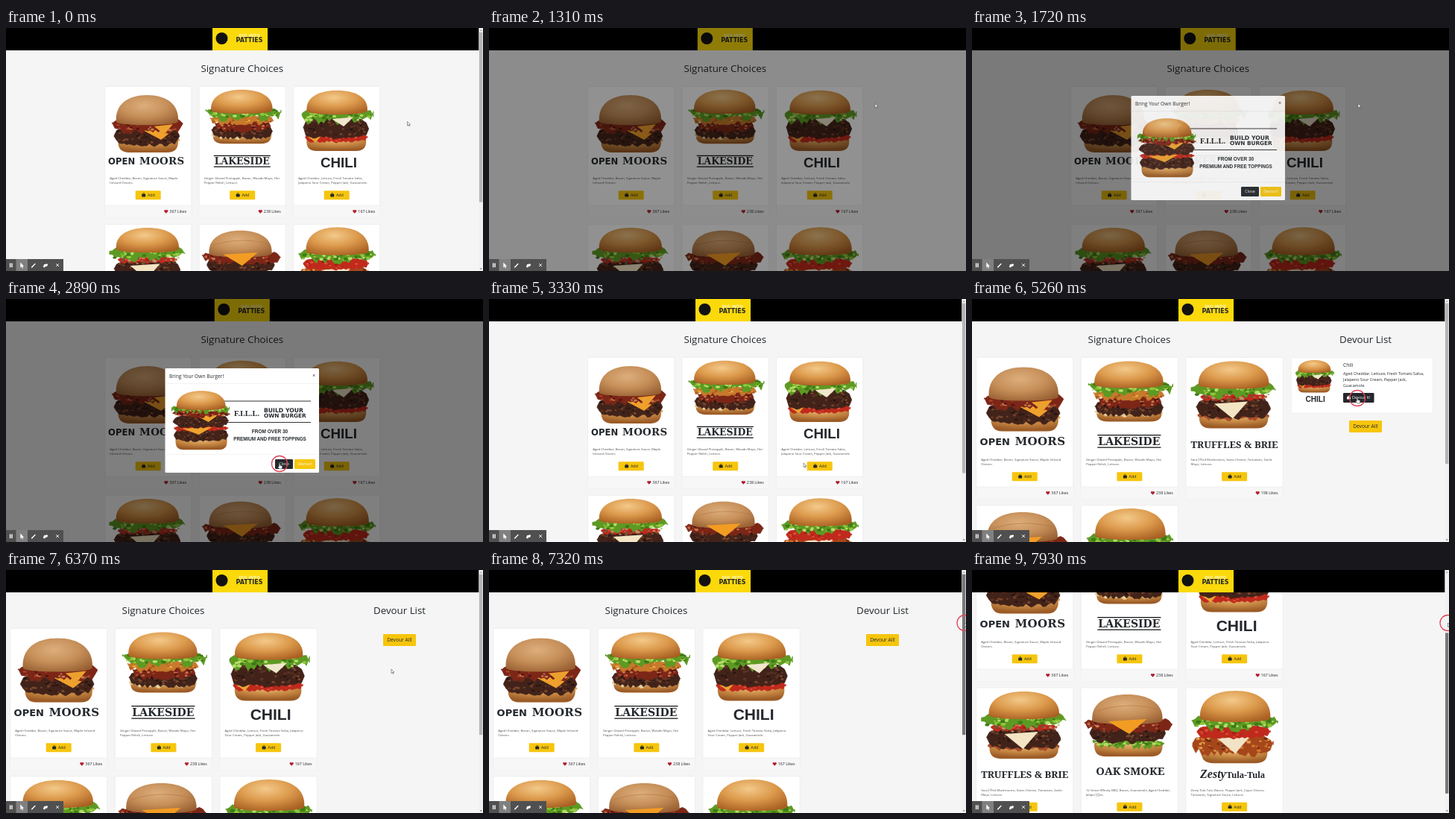
An HTML page for the animation above (8000 ms loop, 640x326 px).

```html
<!DOCTYPE html>
<html lang="en">
<head>
<meta charset="utf-8">
<title>Burger menu</title>
<style>
  html, body { margin: 0; width: 100%; height: 100%; overflow: hidden; background: #f5f5f5; }
  svg { display: block; width: 100vw; height: 100vh; }
  text { font-family: "Open Sans", sans-serif; fill: #24282c; }
  .sans { font-family: "DejaVu Sans", sans-serif; font-weight: 700; }
  .slab { font-family: "DejaVu Serif", serif; font-weight: 700; }
  .serif { font-family: "Noto Serif", serif; font-weight: 700; }
  .times { font-family: "Liberation Serif", serif; font-weight: 700; }
  .arial { font-family: "Liberation Sans", sans-serif; font-weight: 700; }
</style>
</head>
<body>
<svg id="stage" viewBox="0 0 640 326" preserveAspectRatio="none"></svg>
<script>
const LOOP = 8000;
const YELLOW = '#f6c50d', INK = '#24282c';

// Small markup helpers
const rect = (x, y, w, h, fill, more = '') =>
  `<rect x="${x}" y="${y}" width="${w}" height="${h}" fill="${fill}" ${more}/>`;
const path = (d, fill, more = '') => `<path d="${d}" fill="${fill}" ${more}/>`;
const line = (x0, x1, y, color, width = 0.5) =>
  path(`M${x0} ${y}H${x1}`, 'none', `stroke="${color}" stroke-width="${width}"`);
const text = (x, y, size, str, more = '') =>
  `<text x="${x}" y="${y}" font-size="${size}" ${more}>${str.replace(/&/g, '&amp;')}</text>`;
const MID = 'text-anchor="middle"', END = 'text-anchor="end"';
const group = (id, body, more = '') => `<g id="${id}" ${more}>${body}</g>`;
const at = (x, y, body, scale = 1) => `<g transform="translate(${x} ${y}) scale(${scale})">${body}</g>`;

function random(seed) {
  return () => {
    seed = (seed * 16807 + 11) % 2147483647;
    return seed / 2147483647;
  };
}

// Burger parts, drawn on a 130 unit square
function band(x0, x1, y0, y1, fill, rough = 1.5, seed = 7) {
  const rnd = random(seed * 977), n = 26, top = [], low = [];
  const mid = (y0 + y1) / 2, half = (y1 - y0) / 2;
  for (let i = 0; i <= n; i++) {
    const u = i / n * 2 - 1;
    const h = half * Math.sqrt(1 - u ** 6);
    const x = (x0 + (x1 - x0) * i / n).toFixed(1);
    top.push(`${x} ${(mid - h + (rnd() - 0.5) * rough).toFixed(1)}`);
    low.unshift(`${x} ${(mid + h + (rnd() - 0.5) * rough * 2).toFixed(1)}`);
  }
  return path(`M${top.concat(low).join('L')}Z`, fill, `stroke="${fill}" stroke-width=".8" stroke-linejoin="round"`);
}

function spots(x0, x1, y0, y1, count, colors, size = 2, seed = 5) {
  const rnd = random(seed * 1231);
  let out = '';
  for (let i = 0; i < count; i++) {
    const x = x0 + (x1 - x0) * rnd(), y = y0 + (y1 - y0) * rnd(), r = size * (0.4 + rnd() * 0.6);
    out += `<ellipse cx="${x.toFixed(1)}" cy="${y.toFixed(1)}" rx="${(r * 1.5).toFixed(1)}" ry="${r.toFixed(1)}" fill="${colors[i % colors.length]}"/>`;
  }
  return out;
}

const crown = (x0, x1, y0, y1, fill = 'url(#bun)') => {
  const w = x1 - x0, h = y1 - y0, c = x0 + w / 2;
  return path(`M${x0} ${y1 - 3}C${x0 - 2} ${y0 + h * 0.3} ${x0 + w * 0.2} ${y0} ${c} ${y0}` +
    `S${x1 + 2} ${y0 + h * 0.3} ${x1} ${y1 - 3}Q${x1 - 4} ${y1 + 2} ${c} ${y1 + 2}T${x0} ${y1 - 3}Z`, fill);
};
const heel = (x0, x1, y0, y1) =>
  path(`M${x0} ${y0}H${x1}Q${x1 + 2} ${y1} ${x1 - 15} ${y1}H${x0 + 15}Q${x0 - 2} ${y1} ${x0} ${y0}Z`, 'url(#heel)');
const patty = (x0, x1, y0, y1, seed = 3) => band(x0, x1, y0, y1, '#42231a', 2.5, seed) +
  spots(x0 + 5, x1 - 5, y0 + 3, y1 - 3, 60, ['#5d3424', '#2a1511', '#79472e'], 1.7, seed);
const leaf = (x0, x1, y0, y1, seed = 4) => band(x0, x1, y0, y1, '#5d9a23', 6, seed) +
  spots(x0 + 6, x1 - 6, y0 + 2, y1 - 1, 48, ['#8fc63c', '#b5dc68', '#3f7a17'], 2.4, seed);
const bacon = (x0, x1, y0, y1, seed = 6) => band(x0, x1, y0, y1, '#7c2617', 4, seed) +
  spots(x0 + 4, x1 - 4, y0 + 1, y1 - 1, 34, ['#a8432a', '#531510', '#c77a50'], 1.8, seed);
const cheese = (x, y, w, h, fill) => path(`M${x} ${y}L${x + w} ${y - 3}L${x + w * 0.55} ${y + h}Z`, fill);
const tomato = (x0, x1, y0, y1) => band(x0, x1, y0, y1, '#c02a1c', 2, 9) +
  spots(x0 + 5, x1 - 5, y0 + 1, y1 - 1, 22, ['#dd5038', '#a01c14'], 1.7, 8);

const burgers = {
  moors: heel(20, 110, 78, 99) + band(17, 112, 76, 84, '#d79a55', 2) + patty(14, 112, 62, 88) +
    cheese(58, 66, 48, 14, '#f0a02c') + bacon(11, 117, 47, 68) + cheese(74, 60, 28, 12, '#eca02e') +
    crown(17, 110, 13, 56, 'url(#plain)') +
    text(5, 117, 13, 'OPEN', 'class="sans"') + text(52, 117, 15, 'MOORS', 'class="slab" letter-spacing=".3"'),
  lake: heel(21, 108, 71, 86) + band(19, 109, 69, 77, '#e7cf9a', 3) + patty(19, 110, 57, 77, 8) +
    bacon(24, 107, 51, 65, 2) + band(17, 111, 44, 55, '#c77a2b', 3, 2) +
    spots(20, 108, 46, 53, 22, ['#e7a547', '#a85a1e'], 1.8) + leaf(10, 123, 33, 47) + crown(18, 110, 5, 39) +
    line(22, 107, 104, '#111', 1.2) + line(22, 107, 120.5, '#111', 1.2) +
    text(64.5, 117.5, 14, 'LAKESIDE', `class="slab" ${MID}`),
  chili: heel(20, 109, 79, 97) + tomato(18, 111, 70, 83) + cheese(19, 73, 26, 11, '#eaa535') +
    patty(15, 113, 48, 77, 12) + leaf(13, 120, 34, 52, 9) + cheese(58, 49, 32, 11, '#f1e6ce') + crown(20, 111, 6, 40) +
    text(68, 122, 21, 'CHILI', `class="arial" ${MID}`),
  truffle: heel(18, 110, 77, 95) + band(16, 111, 74, 82, '#a84d29', 3) + patty(14, 113, 54, 81, 14) +
    tomato(20, 108, 49, 57) + spots(18, 108, 49, 59, 26, ['#b99064', '#7a5132'], 2.2, 11) +
    cheese(38, 62, 45, 20, '#f3e5c3') + leaf(7, 120, 34, 51, 15) + crown(17, 111, 5, 40) +
    text(65, 121, 13, 'TRUFFLES & BRIE', `class="serif" ${MID}`),
  oak: heel(18, 109, 74, 92) + leaf(16, 111, 69, 77, 5) + patty(12, 113, 48, 73, 17) +
    bacon(5, 122, 41, 57, 8) + crown(15, 109, 9, 47, 'url(#plain)') +
    path('M22 31Q60 18 104 29', 'none', 'stroke="#b37543" stroke-width="1.2" opacity=".6"') +
    cheese(36, 45, 52, 17, '#f39c23') +
    text(66, 117, 14.8, 'OAK SMOKE', `class="serif" ${MID}`),
  tula: heel(21, 109, 83, 101) + band(9, 117, 64, 88, '#a6471b', 5, 21) +
    spots(13, 112, 67, 85, 65, ['#ce742d', '#762c13', '#e09a4c'], 2, 4) +
    cheese(42, 68, 44, 20, '#f3e3c6') + tomato(15, 113, 51, 67) + leaf(8, 123, 39, 54, 18) + crown(19, 113, 4, 44) +
    text(19, 121, 16, 'Zesty', 'class="times" font-style="italic"') + text(54, 121, 12.5, 'Tula-Tula', 'class="times"'),
  stack: heel(15, 117, 103, 124) + patty(12, 119, 83, 106, 31) + tomato(12, 119, 77, 86) +
    cheese(28, 82, 60, 12, '#efa32e') + patty(10, 120, 56, 79, 33) + cheese(50, 54, 55, 15, '#f0a62f') +
    tomato(12, 118, 45, 55) + bacon(9, 123, 48, 57, 34) + leaf(7, 122, 36, 48, 35) + crown(17, 114, 7, 43)
};

// name, likes, narrow lines, wide lines (when the break differs)
const menu = [
  ['moors', 367, 'Aged Cheddar, Bacon, Signature Sauce, Maple|Infused Onions.',
    'Aged Cheddar, Bacon, Signature Sauce, Maple Infused|Onions.'],
  ['lake', 238, 'Ginger Glazed Pineapple, Bacon, Wasabi Mayo, Hot|Pepper Relish, Lettuce.'],
  ['chili', 167, 'Aged Cheddar, Lettuce, Fresh Tomato Salsa,|Jalapeno Sour Cream, Pepper Jack, Guacamole.',
    'Aged Cheddar, Lettuce, Fresh Tomato Salsa, Jalapeno|Sour Cream, Pepper Jack, Guacamole.'],
  ['truffle', 198, 'Saut├®ed Mushrooms, Swiss Cheese, Tomatoes, Garlic|Mayo, Lettuce.'],
  ['oak', 154, '12 Grove Whisky BBQ, Bacon, Guacamole, Aged Cheddar,|Jalape├▒os.'],
  ['tula', 121, 'Zesty Tula Tula, Bacon, Pepper Jack, Cajun Onions,|Tomatoes, Signature Sauce, Lettuce.']
];

const heart = (x, y) => path(`M${x} ${y + 2.4}l-2.4-2.5a1.35 1.35 0 0 1 2.4-1.7a1.35 1.35 0 0 1 2.4 1.7Z`, '#b3202c');
const bag = (x, y, fill) => rect(x, y, 5, 3.6, fill, 'rx=".7"') +
  path(`M${x + 1.5} ${y}v-1h2v1`, 'none', `stroke="${fill}" stroke-width=".7"`);
const button = (x, y, w, h, fill) => rect(x, y, w, h, fill, 'rx="1.2"');

function card([name, likes, narrow, wide], x, y, w, open) {
  const lines = (open && wide || narrow).split('|'), c = w / 2;
  return at(x, y,
    rect(0, 0, w, w + 60, '#fff', 'rx="1.2" stroke="#dfdfdf" stroke-width=".4"') +
    rect(0.2, w + 43.4, w - 0.4, 16.4, '#f7f7f7') + line(0, w, w + 43.4, '#dfdfdf', 0.4) +
    at(0, 0, burgers[name], w / 130) +
    lines.map((s, i) => text(6.6, w + 8.3 + i * 6.5, 4.27, s, 'opacity=".8"')).join('') +
    button(c - 17, w + 23.6, 34, 12, YELLOW) + bag(c - 8.5, w + 28.2, INK) + text(c - 0.8, w + 31.6, 5.33, 'Add') +
    heart(w - 34, w + 51.8) + text(w - 6.6, w + 53.6, 5.33, `${likes} Likes`, END));
}

function grid(items, x, w, step, pitch, open) {
  return items.map((it, i) => card(it, x + i % 3 * step, 78.4 + Math.floor(i / 3) * pitch, w, open)).join('');
}
const wideGrid = items => grid(items, 5.6, 130.2, 140.7, 198.6, true) +
  text(211, 59, 13.33, 'Signature Choices', MID) + text(528, 59, 13.33, 'Devour List', MID);
const devourAll = y => button(506, y, 44, 16, YELLOW) + text(528, y + 10.4, 6.67, 'Devour All!', MID);

const closedPage = grid(menu, 132.6, 116.2, 126.5, 185.2, false) + text(316.8, 59, 13.33, 'Signature Choices', MID);
const pickedPage = wideGrid(menu.filter(it => it[0] !== 'chili')) +
  rect(428.3, 79, 190, 74, '#fff', 'rx="1.2" stroke="#e2e2e2" stroke-width=".4"') + at(428, 79, burgers.chili, 0.48) +
  text(498, 91, 6.67, 'Chili') +
  ['Aged Cheddar, Lettuce, Fresh Tomato Salsa,', 'Jalapeno Sour Cream, Pepper Jack,', 'Guacamole.']
    .map((s, i) => text(498, 102.4 + i * 8, 5.33, s)).join('') +
  button(498, 126, 41.5, 13, INK) + bag(503, 131, '#fff') + text(510, 134.3, 5.33, 'Devour It!', 'style="fill:#fff"') +
  devourAll(163);
const emptyPage = wideGrid(menu) + devourAll(86);

const logo = rect(0, 0, 74, 30, '#fbd90b') + `<circle cx="12.5" cy="14" r="8" fill="#111"/>` +
  text(49.5, 12.3, 5.6, 'DIG INTO', `class="sans" style="fill:#fff6bd" ${MID}`) +
  text(49.5, 18.6, 8, 'PATTIES', `class="sans" ${MID}`);

const modal = rect(213.5, 93, 206.5, 140, '#fff', 'rx="1.5"') + text(219, 105.6, 6.67, 'Bring Your Own Burger!') +
  text(413, 105, 6.5, '×', MID) + line(213.5, 420, 113.5, '#e3e3e3') + line(213.5, 420, 208.5, '#e9e9e9') +
  line(285, 409, 137, '#333', 1) + line(285, 409, 165.5, '#333', 1) + at(217.5, 118.5, burgers.stack, 0.675) +
  text(323, 157, 10.5, 'F.I.L.L.', `class="times" ${MID}`) +
  text(346, 151.5, 7.7, 'BUILD YOUR', 'class="sans"') + text(346, 159, 7.3, 'OWN BURGER', 'class="sans"') +
  text(354, 180, 6.5, 'FROM OVER 30', `class="arial" ${MID}`) +
  text(354, 190, 6.3, 'PREMIUM AND FREE TOPPINGS', `class="arial" ${MID}`) +
  button(361, 215, 24, 13, INK) + text(373, 223.4, 5.33, 'Close', `${MID} style="fill:#fff"`) +
  button(387, 215, 28, 13, YELLOW) + text(401, 223.4, 5.33, 'Devour!', `${MID} style="fill:#fff"`);

const white = 'stroke="#fff" stroke-width="1.4" stroke-linecap="round"';
const toolbar = rect(0, 310, 77, 16, '#505050') + rect(13.5, 310, 15.5, 16, '#808080') +
  path('M5.6 316v4.6M8 316v4.6', 'none', white) +
  path('M19.3 314.6v7l1.6-1.5 1.1 2.3 1-.5-1.1-2.2h2.2Z', '#fff') +
  path('M35.3 320.2l3.6-3.7', 'none', white) + path('M33.8 321.7l.7-2.2 1.5 1.5Z', '#fff') +
  path('M51 321l1-2.6h2.2l.8-2', 'none', 'stroke="#fff" stroke-width="2.6"') +
  path('M67.2 316.2l3.8 3.8m0-3.8l-3.8 3.8', 'none', 'stroke="#fff" stroke-width=".9"');

const arrow = path('M0 0V5.6L1.4 4.4 2.3 6.3 3.1 5.9 2.2 4.1H4Z', '#fff', 'stroke="#333" stroke-width=".5"');
const hand = path('M-.8 0q.8-.8 1.5 0v2.3l2.4.6q1 .4.7 1.6l-.6 2.4h-3.4l-2.2-2.7q.5-1 1.6-.1Z', '#fff', 'stroke="#222" stroke-width=".5"');

const shade = (id, stops, more) => `<radialGradient id="${id}" ${more}>` +
  stops.map((c, i) => `<stop offset="${i / (stops.length - 1)}" stop-color="${c}"/>`).join('') + '</radialGradient>';

document.getElementById('stage').innerHTML =
  '<defs>' + shade('bun', ['#f3c98a', '#dc9a4c', '#a95f22'], 'cx=".45" cy=".3" r=".75"') +
  shade('plain', ['#dcae7c', '#c68f59', '#955d30'], 'cx=".45" cy=".35" r=".75"') +
  shade('heel', ['#e6b874', '#c88a45', '#9c5c27'], 'cx=".5" cy=".1" r=".8"') + '</defs>' +
  rect(0, 0, 640, 326, '#f5f5f5') +
  group('page', group('closed', closedPage) + group('picked', pickedPage) + group('empty', emptyPage)) +
  rect(0, 0, 640, 30, '#000') + group('logo', logo) +
  group('bar', rect(634.3, 0, 5.7, 326, '#f1f1f1') + path('M635.8 3.8l1.4-1.6 1.4 1.6Z', '#777') +
    path('M635.8 322.4l1.4 1.6 1.4-1.6Z', '#505050') + rect(635, 5.7, 4.3, 10, '#b5b5b5', 'id="thumb"')) +
  rect(0, 0, 640, 326, '#000', 'id="dim"') + group('modal', modal) + toolbar +
  group('pointer', `<circle id="ring" r="10.5" fill="none" stroke="#e0475a" stroke-width="1.3"/>` +
    group('arrow', arrow) + group('hand', hand));

// Each step holds until the next one; values carry over
const steps = [
  [0, { x: 538.5, y: 125.5, bar: 1, dim: 0, modal: 0, rise: 0, view: 'closed', scroll: 0, ring: 0, hand: 0, grab: 0 }],
  [100, { x: 535, y: 121 }], [215, { x: 528, y: 112 }], [330, { x: 521, y: 104, bar: 0 }], [450, { x: 518, y: 101.5 }],
  [1310, { dim: 0.43 }], [1440, { dim: 0.5, modal: 0.45, rise: 7 }], [1585, { modal: 0.9, rise: 2 }],
  [1730, { modal: 1, rise: 0 }], [1880, { x: 492, y: 136 }], [2030, { x: 450, y: 181 }],
  [2170, { x: 414, y: 212 }], [2320, { x: 396, y: 219, hand: 1 }], [2450, { x: 367, y: 221 }],
  [2740, { ring: 1 }], [3050, { ring: 0, modal: 0.5, rise: 5 }], [3190, { modal: 0, dim: 0.25, x: 390, y: 222, hand: 0 }],
  [3330, { dim: 0, bar: 1, x: 422, y: 220 }], [3470, { x: 434, y: 222, hand: 1 }], [3620, { x: 442, y: 222 }],
  [3810, { ring: 1 }], [3945, { view: 'picked', hand: 0 }], [4080, { ring: 0 }], [4350, { x: 444, y: 218 }],
  [4840, { x: 468, y: 188 }], [4980, { x: 496, y: 156 }], [5120, { x: 517, y: 133, hand: 1 }], [5260, { ring: 1 }],
  [6050, { ring: 0 }], [6225, { view: 'empty', hand: 0 }],
  [7030, { x: 565, y: 110 }], [7175, { x: 612, y: 82 }], [7320, { x: 638.5, y: 71, ring: 1, grab: 1 }],
  [7790, { scroll: 62 }], [7930, { scroll: 119 }]
];
let carry = {};
const poses = steps.map(([time, change]) => ({ time, pose: carry = { ...carry, ...change } }));

const el = id => document.getElementById(id);
const set = (id, name, value) => el(id).setAttribute(name, value);
const show = (id, on) => set(id, 'display', on ? 'inline' : 'none');

function draw(p) {
  for (const id of ['closed', 'picked', 'empty']) show(id, id === p.view);
  set('page', 'transform', `translate(0 ${-p.scroll})`);
  set('logo', 'transform', `translate(${p.bar ? 277 : 279.8} 0)`);
  const ratio = 314.6 / (p.view === 'closed' ? 450 : 476);
  show('bar', p.bar);
  set('thumb', 'y', 5.7 + p.scroll * ratio);
  set('thumb', 'height', 326 * ratio);
  set('thumb', 'fill', p.grab ? '#787878' : '#b5b5b5');
  set('dim', 'opacity', p.dim);
  set('modal', 'opacity', p.modal);
  set('modal', 'transform', `translate(0 ${-p.rise})`);
  set('pointer', 'transform', `translate(${p.x} ${p.y})`);
  show('ring', p.ring);
  show('hand', p.hand);
  show('arrow', !p.hand);
}

const start = performance.now();
let shown;
function tick() {
  const t = (performance.now() - start) % LOOP;
  const { pose } = poses.findLast(s => s.time <= t);
  if (pose !== shown) draw(shown = pose);
  requestAnimationFrame(tick);
}
tick();
</script>
</body>
</html>
```
